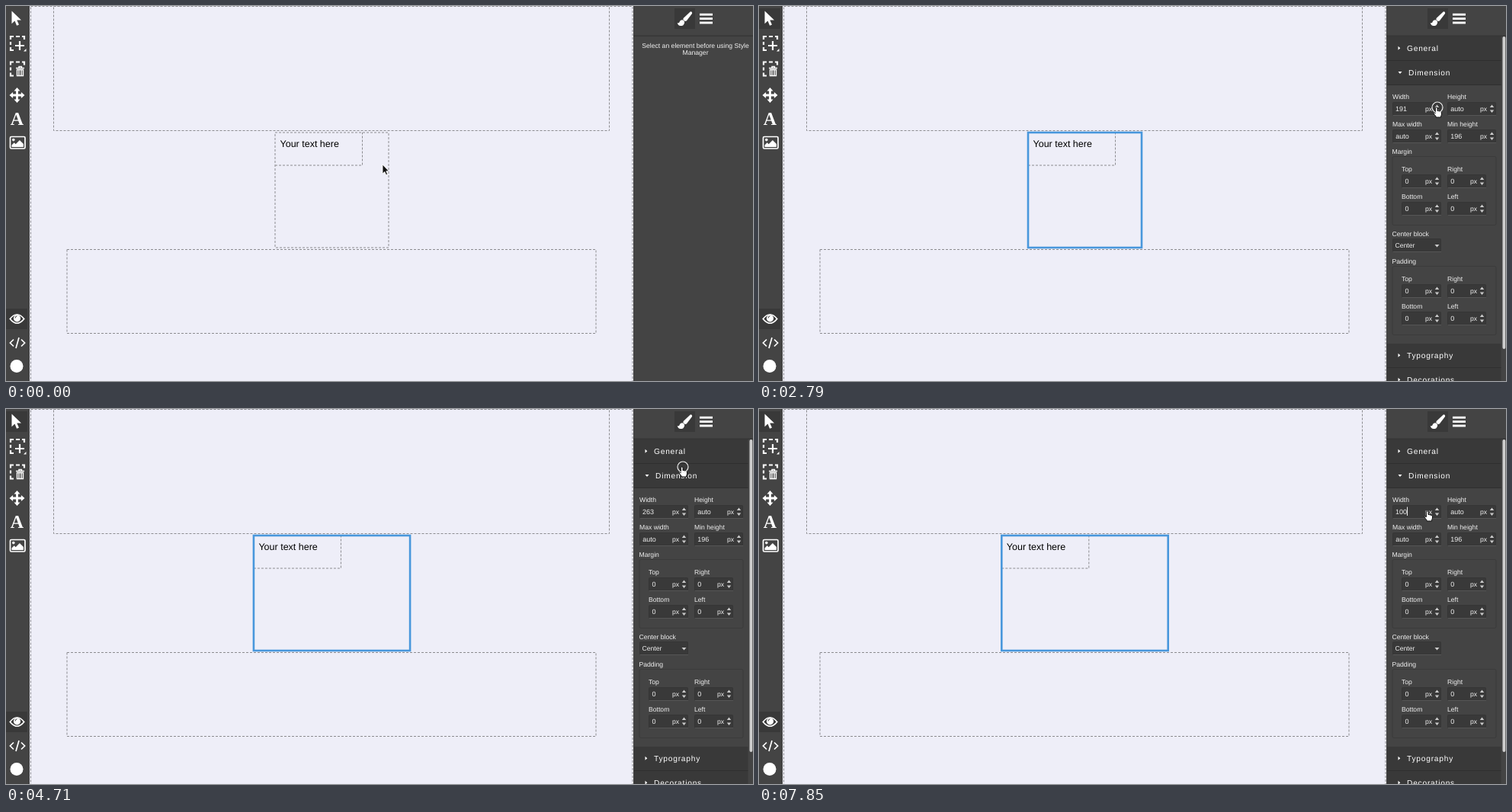
Write an HTML page that moves like this. It is 980 px wide and 492 px high and loops after 8000 ms.

```html
<!DOCTYPE html>
<html lang="en">
<head>
<meta charset="utf-8">
<title>Style manager</title>
<style>
html, body { margin: 0; width: 100%; height: 100%; overflow: hidden; background: #444; }
svg { display: block; width: 980px; height: 492px; }
text { font-family: "Liberation Sans", Arial, sans-serif; text-rendering: geometricPrecision; white-space: pre; }
.dash { fill: none; stroke: #8c8c90; stroke-dasharray: 3 2; }
.icon { fill: none; stroke: #fff; stroke-width: 2.2; }
.solid { fill: #fff; }
.small { font-size: 8.64px; fill: #f0f0f0; }
.value { font-size: 9px; fill: #f0f0f0; }
.head { font-size: 10.2px; letter-spacing: .785px; fill: #fff; }
.badge { font-size: 9.3px; fill: #fff; }
</style>
</head>
<body>
<svg id="stage" viewBox="0 0 980 492" xmlns="http://www.w3.org/2000/svg"></svg>
<script>
const BLUE = '#4897dc', DARK = '#393939';
const stage = document.getElementById('stage');

const rect = (x, y, w, h, attrs = '') => `<rect x="${x}" y="${y}" width="${w}" height="${h}" ${attrs}/>`;
const path = (d, attrs) => `<path d="${d}" ${attrs}/>`;
const text = (x, y, s, cls, attrs = '') => `<text x="${x}" y="${y}" class="${cls}" ${attrs}>${s}</text>`;
const group = (id, body) => `<g id="${id}">${body}</g>`;

function canvas() {
  return rect(31, 0, 792, 492, 'fill="#eeeef8"')
    + rect(32.5, .5, 789.5, 500, 'class="dash"')
    + rect(62.5, .5, 729, 163, 'class="dash"')
    + rect(80, 319.5, 694, 110, 'class="dash"')
    + group('bodyHover', rect(32.5, .5, 790, 491, `fill="none" stroke="${BLUE}"`) + badge(32, 0, 30, 'Body'))
    + group('boxHover',
        rect(62.5, .5, 729, 163, 'fill="none" stroke="#7d8c80"')
        + path('M62.5 0V163.5', `stroke="${BLUE}"`) + badge(61.5, 0, 44.5, 'Box2093'))
    + group('inner',
        path('M0 209H114.5V166', 'class="dash"')
        + text(6.5, 184.5, 'Your text here', '', 'font-size="12.5"'))
    + rect(353, 166, 149, 151, 'id="block" fill="none"')
    + group('blockHover', badge(352, 152, 44.5, 'Box2094'));
}

function badge(x, y, w, label) {
  return rect(x, y, w, 12.5, `fill="${BLUE}"`) + text(x + 4, y + 9, label, 'badge');
}

function toolbar() {
  const frame = 'M6 44v-4h4M13 40h5M21 40h3v4M6 47v4M6 54v4h4';
  const arrow = 'M14.5 107l4 4.6h-2.6v4h4v-2.6l4.6 4-4.6 4v-2.6h-4v4h2.6l-4 4.6-4-4.6h2.6v-4h-4v2.6l-4.6-4 4.6-4v2.6h4v-4h-2.6z';
  return rect(0, 0, 31, 492, 'fill="#444"')
    + rect(0, 3, 28, 27, `id="selectOn" fill="${DARK}"`)
    + rect(0, 397, 28, 27, `fill="${DARK}"`)
    + path('M7.5 6.5V23.2l4-3.7 2.6 6.3 2.9-1.2-2.7-6.1H20z', 'class="solid"')
    + path(frame, 'class="icon"')
    + path('M18 46v12M12 52h12', 'class="icon" stroke-width="3"')
    + path('M26.5 56v3.5h-3.5z', 'class="solid"')
    + path(frame, 'class="icon" transform="translate(0 33.5)"')
    + path('M13 81.5h11M17 81v-1.5h3.5v1.5M14.5 83.5h8v8h-8zM17 84v7M20 84v7', 'class="icon" style="stroke-width:1.4"')
    + path(arrow, 'class="solid"')
    + text(5.7, 156, 'A', 'solid', 'style="font:bold 24px \'Liberation Serif\',serif"')
    + rect(5.5, 171.5, 19.5, 15.5, 'class="icon" rx="1.5" style="stroke-width:1.7"')
    + '<circle cx="9.8" cy="175.6" r="1.8" class="solid"/>'
    + path('M7.5 185v-2.6l3.2-3.2 2 2 5.2-5.2 5 5v4z', 'class="solid"')
    + path('M5.3 410.5Q14.5 399 23.7 410.5Q14.5 422 5.3 410.5z', 'class="icon" style="stroke-width:1.7"')
    + '<circle cx="14.5" cy="409.8" r="4.6" class="solid"/>'
    + path('M12 409.5q0-2.4 2.4-2.5', `fill="none" stroke="${DARK}"`)
    + path('M10 437.5l-4.6 4.5 4.6 4.5M20 437.5l4.6 4.5-4.6 4.5M17 435l-4 14', 'class="icon" style="stroke-width:1.7"')
    + '<circle cx="14" cy="472.5" r="8.5" class="solid"/>';
}

function panelTop() {
  return rect(823, 0, 157, 492, 'fill="#444"')
    + rect(877, 3, 27, 27, `fill="${DARK}"`)
    + path('M898 7.2q2.6.3 2 2.8l-7 9.2q-1.2 1-2.6.6l-2-1.9q-.3-1.4.8-2.5z', 'class="solid"')
    + path('M887.3 18.3q3.2 1 2.8 3.6-.8 4.2-5.2 4.2-3.2 0-4.2-4 2 1 2.8-.8.8-3 3.8-3z', 'class="solid"')
    + [9.8, 15.2, 20.6].map(y => rect(910, y, 17, 2.8, 'class="solid"')).join('')
    + rect(823, 38.5, 157, 1.5, 'fill="#363636"');
}

function header(y, w, label, open) {
  const mark = open ? `M838.5 ${y + 14}h5l-2.5 3z` : `M838.5 ${y + 12.8}v5l2.8-2.5z`;
  return rect(824, y, w, 32, `fill="${DARK}"`)
    + rect(824, y + 31, w, 1, 'fill="#2f2f2f"')
    + path(mark, 'class="solid"')
    + text(open ? 852 : 850, y + 19, label, 'head');
}

function box(x, y, w) {
  return rect(x + .5, y + .5, w - 1, 16.5, `fill="${DARK}" stroke="#353535" rx="1"`)
    + rect(x + 1, y + 17, w - 1, 1, 'fill="#565656"');
}

function field(x, y, w, label, value) {
  const a = x + w - 5.5;
  return text(x, y - 4, label, 'small') + box(x, y, w)
    + (value ? text(x + (w < 60 && x < 900 ? 4.5 : 4.3), y + 11.6, value, 'value') : '')
    + text(x + w - 21, y + 11.6, 'px', 'small')
    + path(`M${a - 2.7} ${y + 7}h5.4l-2.7-3.4zM${a - 2.7} ${y + 10.5}h5.4l-2.7 3.4z`, 'fill="#ccc"');
}

function sides(y, label) {
  return text(830.5, y - 3, label, 'small')
    + rect(831, y + .5, 136, 90, 'fill="none" stroke="#3b3b3b" rx="2"')
    + field(843, y + 24, 52, 'Top', '0') + field(903, y + 24, 51, 'Right', '0')
    + field(843, y + 60, 52, 'Bottom', '0') + field(903, y + 60, 51, 'Left', '0');
}

function panel() {
  const names = ['General', 'Dimension', 'Typography', 'Decorations', 'Extra'];
  return panelTop()
    + group('hint', text(904.5, 54.6, 'Select an element before using Style', 'small', 'text-anchor="middle"')
        + text(904.5, 64.4, 'Manager', 'small', 'text-anchor="middle"'))
    + group('closed', names.map((n, i) => header(40 + 32 * i, 156, n)).join(''))
    + group('opened',
        header(40, 149.5, names[0]) + header(72, 149.5, names[1], true)
        + field(831, 126, 64, 'Width', '') + field(903, 126, 64, 'Height', 'auto')
        + field(831, 162, 64, 'Max width', 'auto') + field(903, 162, 64, 'Min height', '196')
        + sides(197, 'Margin')
        + text(830.5, 301.5, 'Center block', 'small') + box(831, 305, 64)
        + text(834.5, 317.3, 'Center', 'small') + path('M886.5 313h6l-3 3.4z', 'fill="#ccc"')
        + sides(341, 'Padding')
        + header(443, 149.5, names[2]) + header(475, 149.5, names[3])
        + rect(975.5, 40, 3.8, 410, 'fill="#cfcfcf" rx="1.9"')
        + text(835, 137.6, '', 'value', 'id="width"')
        + rect(835, 128, 16, 13, 'id="picked" fill="#c0d8ee"')
        + rect(850, 128.5, 1, 11.5, 'id="caret" fill="#eee"'));
}

function pointers() {
  const hand = 'M-1.6 7V1.2a1.3 1.3 0 0 1 2.6 0V4.6q1.3-.7 2 .4 1.3-.5 1.9.6 1.6-.3 1.6 1.2V9q0 1-1 2.5V13H-1v-1.2Q-3 9.5-4 7.6-3.6 6-1.6 7.6z';
  return group('pointer',
    path('M0 0V12l2.8-2.5 1.8 4.1 2-.9-1.8-4H8.3z', 'id="arrow" fill="#111" stroke="#fff" stroke-width=".8"')
    + path('M-2-7q2 0 2 1.5V5.500q0 1.500-2 1.500M2-7q-2 0-2 1.500M2 7q-2 0-2-1.500', 'id="beam" fill="none" stroke="#1c1c1c"')
    + group('hand', path(hand, 'fill="#fff" stroke="#111"'))
    + '<circle id="press" cx="1" cy="0" r="7" fill="none" stroke="#eee" stroke-width="1.2"/>');
}

stage.innerHTML = canvas() + toolbar() + panel() + pointers();
const el = {};
stage.querySelectorAll('[id]').forEach(e => el[e.id] = e);
const show = (id, on) => el[id].style.display = on ? '' : 'none';

// [tick, x, y]
const moves = [
  [0, 494, 208], [1, 440, 180], [4, 14, 16], [5, 45, 40], [7, 390, 163], [8, 398, 186],
  [10, 398, 186], [11, 560, 150], [13, 889, 71], [15, 885, 86], [16, 885, 86], [18, 889, 133],
  [19, 889, 133], [26, 888, 93], [29, 888, 57], [32, 887, 76], [33, 887, 63], [34, 883, 86],
  [36, 853, 134], [37, 853, 136], [50, 853, 136], [51, 862, 135], [53, 877, 134]
];
// [tick, width]
const widths = [[19, 191], [26, 242], [29, 290], [32, 263], [33, 280]];

function along(keys, n) {
  let i = 0;
  while (i < keys.length - 1 && keys[i + 1][0] <= n) i++;
  const a = keys[i], b = keys[i + 1];
  if (!b || n <= a[0]) return a.slice(1);
  const k = (n - a[0]) / (b[0] - a[0]);
  return a.slice(1).map((v, j) => v + (b[j + 1] - v) * k);
}

// The screen refreshes in ticks, slightly slower in the second half.
function tickAt(t) {
  const n = t < 3820 ? (t + 10) / 147 : 26 + (t - 3800) / 149.2;
  return Math.min(53, Math.floor(n));
}

function draw(t) {
  const n = tickAt(t);
  const between = (a, b) => n >= a && n < b;

  show('selectOn', n >= 4);
  show('bodyHover', n === 5);
  show('boxHover', between(6, 8));
  show('blockHover', n === 8);
  show('hint', n < 11);
  show('closed', between(11, 16));
  show('opened', n >= 16);

  const [w] = along(widths, n);
  const half = w * .39, left = 427.5 - half;
  el.inner.setAttribute('transform', `translate(${left} 0)`);
  el.block.setAttribute('x', left);
  el.block.setAttribute('width', half * 2);
  el.block.setAttribute('class', n < 8 ? 'dash' : '');
  el.block.setAttribute('stroke', BLUE);
  el.block.setAttribute('stroke-width', n < 9 ? 1 : 2.6);

  const typed = '100'.slice(0, Math.max(0, n - 42));
  el.width.textContent = n < 38 ? Math.round(w) : typed;
  show('picked', between(38, 43));
  show('caret', n >= 43 && !between(49, 51));
  el.caret.setAttribute('x', 835 + typed.length * 5);

  const [x, y] = along(moves, n);
  const beam = between(37, 51), hand = n >= 13 && !beam;
  el.pointer.setAttribute('transform', `translate(${x} ${y})`);
  show('arrow', n < 13);
  show('beam', beam);
  show('hand', hand);
  show('press', between(19, 34));
}

function loop() {
  draw(performance.now() % 8000);
  requestAnimationFrame(loop);
}
loop();
</script>
</body>
</html>
```
